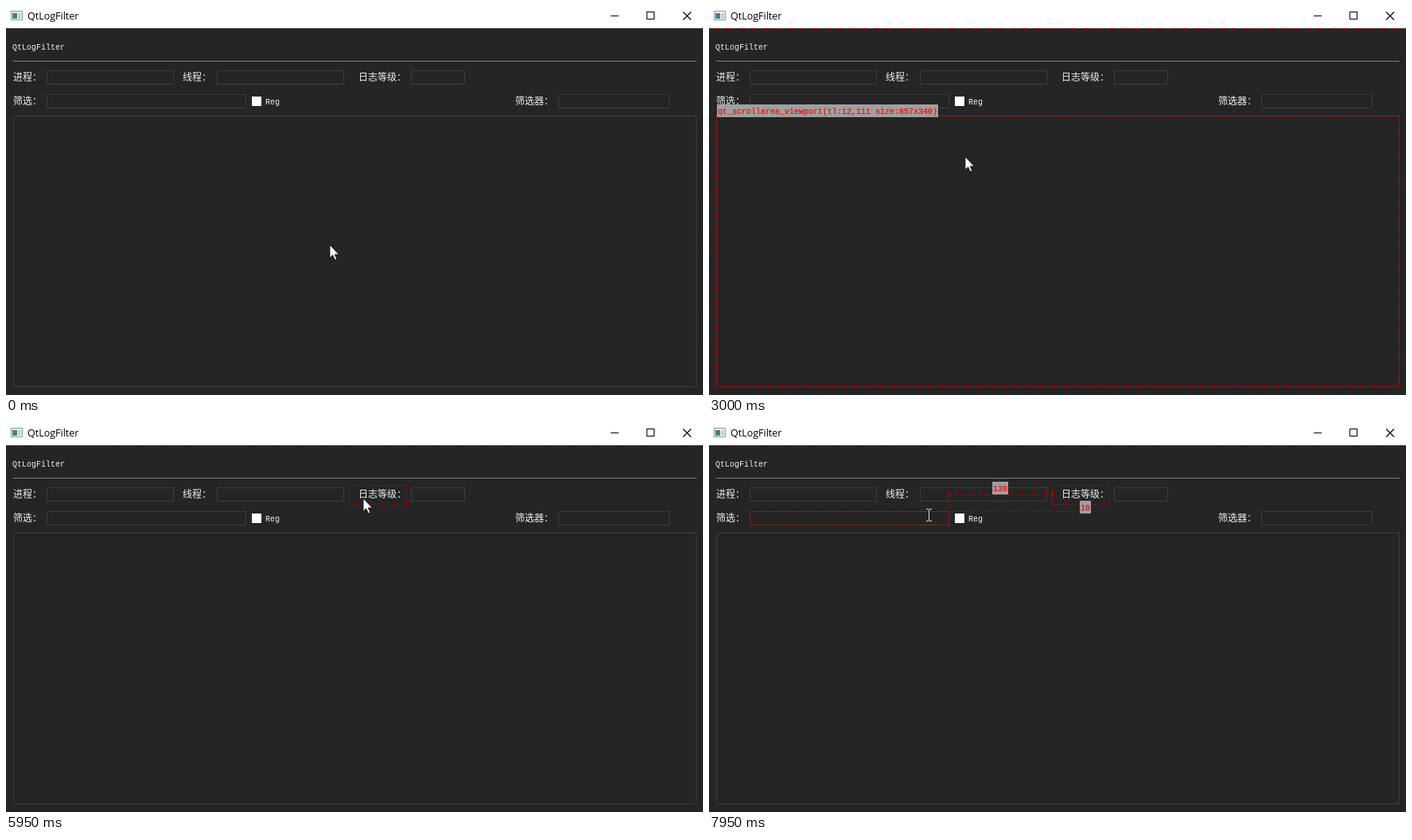
An HTML page that plays this animation: 876x490 px, repeating every 8 s.

```html
<!DOCTYPE html>
<html lang="zh-CN">
<head>
<meta charset="utf-8">
<title>QtLogFilter</title>
<style>
html, body { margin: 0; width: 100%; height: 100%; overflow: hidden; background: #252525; }
svg { display: block; width: 876px; height: 490px; }
text { white-space: pre; }
.mono { font: 10px "Liberation Mono", "DejaVu Sans Mono", monospace; }
.cjk { font: 12px "Noto Sans CJK SC", "Noto Sans CJK", sans-serif; fill: #f0f0f0; }
.title { font: 12.5px "Open Sans", "Noto Sans", sans-serif; fill: #000; }
.crisp { shape-rendering: crispEdges; }
.field { fill: none; stroke: #3e3e3e; }
.dots { fill: none; stroke: #e60000; stroke-dasharray: 1 2; }
.under { fill: none; stroke: #6b2026; }
.tip rect { fill: #a0a0a0; }
.tip text { fill: #f00; stroke: #f00; stroke-width: .2; }
</style>
</head>
<body>
<svg viewBox="0 0 876 490" xmlns="http://www.w3.org/2000/svg">
  <rect width="876" height="490" fill="#252525"/>
  <rect width="876" height="28" fill="#fff"/>
  <g class="crisp">
    <rect x="6.5" y="6.5" width="14" height="11" fill="#f4f6f6" stroke="#8b9699"/>
    <rect x="8" y="9" width="6" height="7" fill="#3f8584"/>
    <rect x="15" y="9" width="4" height="7" fill="#c5d0d2"/>
    <path d="M760 12.5h10M805.5 7.5h9v9h-9z" fill="none" stroke="#000"/>
  </g>
  <path d="M851 7.500l10 10M861 7.500l-10 10" stroke="#000" stroke-width="1.1"/>
  <text class="title" x="27" y="17">QtLogFilter</text>
  <text class="mono" x="8" y="55" fill="#f0f0f0">QtLogFilter</text>
  <path class="crisp" d="M9 69.500h859" stroke="#808080"/>
  <g id="fields"></g>
  <rect class="crisp" x="309" y="114" width="12" height="12" fill="#fff"/>
  <rect id="hot" class="crisp" x="308.500" y="113.500" width="12" height="12" fill="none" stroke="#3b78c4"/>
  <text class="mono" x="326" y="124" fill="#f0f0f0">Reg</text>
  <g id="overlay"></g>
  <path id="arrow" d="M0 0V16.200L3.700 12.800L6.300 18.700L8.700 17.600L6.200 11.900H11.300Z" fill="#fff" stroke="#111" stroke-width=".8"/>
  <path id="beam" class="crisp" d="M-3 -7.500h3M1 -7.500h3M.5 -7v14M-3 7.500h3M1 7.500h3" fill="none" stroke="#d8d8d8"/>
</svg>
<script>
const $ = id => document.getElementById(id);
const LOOP = 8000, STEP = 50;

// x, y, width, height
const R = {
  process: [51, 81, 160, 18],
  thread: [265, 81, 160, 18],
  level: [509, 81, 68, 18],
  filter: [51, 111, 251, 18],
  preset: [694, 111, 140, 18],
  view: [9, 138, 859, 342],
  check: [308, 112, 38, 16],
  label: [431, 78, 73, 25]
};

const box = (r, cls, rx = 0) =>
  `<rect class="crisp ${cls}" x="${r[0] + .5}" y="${r[1] + .5}" width="${r[2] - 1}" height="${r[3] - 1}" rx="${rx}"/>`;
const tip = (x, y, s) =>
  `<g class="tip"><rect x="${x}" y="${y}" width="${s.length * 6 + 2}" height="16"/>` +
  `<text class="mono" x="${x + 1}" y="${y + 12}">${s}</text></g>`;
const dots = d => `<path class="crisp dots" d="${d}"/>`;
const ticks = d => `<path class="crisp" d="${d}" stroke="#e60000"/>`;

// Distance markers with their number
const across = (x1, x2, y, s) =>
  dots(`M${x1} ${y + .5}H${x2}`) +
  ticks(`M${x1 + .5} ${y - 3}v7M${x2 + .5} ${y - 3}v7`) +
  tip(Math.round((x1 + x2) / 2 - s.length * 3 - 1), y - 16, s);
const down = (x, y1, y2, s) =>
  dots(`M${x + .5} ${y1}V${y2}`) +
  ticks(`M${x - 3} ${y1 + .5}h7M${x - 3} ${y2 + .5}h7`) +
  tip(x - 1, Math.round((y1 + y2) / 2 - 8.6), s);

const hover = r => box(r, 'under', 1) + box(r, 'dots');
const root = dots('M0 28.500H876');
const label = root + box(R.label, 'dots');

const scenes = {
  idle: '',
  gap: root,
  view: root + hover(R.view) + tip(10, 124, 'qt_scrollarea_viewport(tl:12,111 size:857x340)'),
  check: root + box(R.check, 'dots') + tip(308, 97, 'check_reg(tl:310,84 size:37x16)'),
  thread: root + hover(R.thread) + tip(265, 66, 'lineEdit_2(tl:267,53 size:160x18)'),
  label: label + tip(431, 63, 'label_3(tl:433,50 size:72x24)'),
  picked: label,
  toRoot: label + across(0, 431, 90, '433') + across(503, 876, 90, '375') +
    down(467, 28, 78, '50') + down(467, 102, 490, '390'),
  toThread: label + hover(R.thread) +
    dots('M345 78.500H431M345 101.500H431M425 90.500H431') +
    tip(344, 71, '3') + tip(344, 91, '3') + tip(423, 74, '7'),
  toFilter: label + hover(R.filter) + dots('M301.500 90V111M301 111.500H467') +
    across(301, 431, 90, '130') + dots('M467.500 102V111') + tip(466, 98, '10')
};

const cues = [
  [0, 'idle'], [2250, 'view'], [3300, 'gap'], [3350, 'check'], [3650, 'gap'],
  [3750, 'thread'], [4400, 'gap'], [4600, 'label'], [5600, 'picked'],
  [6500, 'toRoot'], [6700, 'toThread'], [7550, 'toRoot'], [7700, 'toFilter']
];

// time, x, y of the pointer
const path = [
  [0, 407, 301], [2200, 407, 301], [2250, 352, 273], [2450, 331, 257], [2600, 331, 257],
  [3000, 322, 190], [3400, 314, 122], [3500, 314, 122], [3700, 319, 98], [3850, 332, 91],
  [4250, 332, 91], [4450, 438, 103], [4550, 438, 103], [4650, 453, 95], [5550, 453, 95],
  [5950, 449, 95], [6300, 449, 95], [6500, 430, 94], [6700, 423, 93], [7050, 383, 92],
  [7350, 383, 92], [7550, 335, 101], [7700, 290, 113], [7800, 276, 116], [LOOP, 276, 116]
];

function pointer(t) {
  const i = path.findIndex(p => p[0] > t);
  const [a, b] = [path[i - 1], path[i]];
  const k = (t - a[0]) / (b[0] - a[0]);
  return [1, 2].map(n => Math.round(a[n] + (b[n] - a[n]) * k));
}

const names = [[9, 94, '进程：'], [222, 94, '线程：'], [443, 94, '日志等级：'], [9, 124, '筛选：'], [640, 124, '筛选器：']];
$('fields').innerHTML =
  ['process', 'thread', 'level', 'filter', 'preset', 'view'].map(n => box(R[n], 'field', 1.5)).join('') +
  names.map(([x, y, s]) => `<text class="cjk" x="${x}" y="${y}">${s}</text>`).join('');

let shown = null;
const start = performance.now();

function draw() {
  const t = Math.floor((performance.now() - start) % LOOP / STEP) * STEP;
  const name = cues.filter(c => c[0] <= t).pop()[1];
  if (name !== shown) $('overlay').innerHTML = scenes[shown = name];

  const [x, y] = pointer(t);
  const beam = name === 'toFilter';
  $('arrow').style.display = beam ? 'none' : '';
  $('beam').style.display = beam ? '' : 'none';
  $(beam ? 'beam' : 'arrow').setAttribute('transform', `translate(${x} ${y})`);
  $('hot').style.display = t >= 3350 && t < 3750 ? '' : 'none';
  requestAnimationFrame(draw);
}
draw();
</script>
</body>
</html>
```
